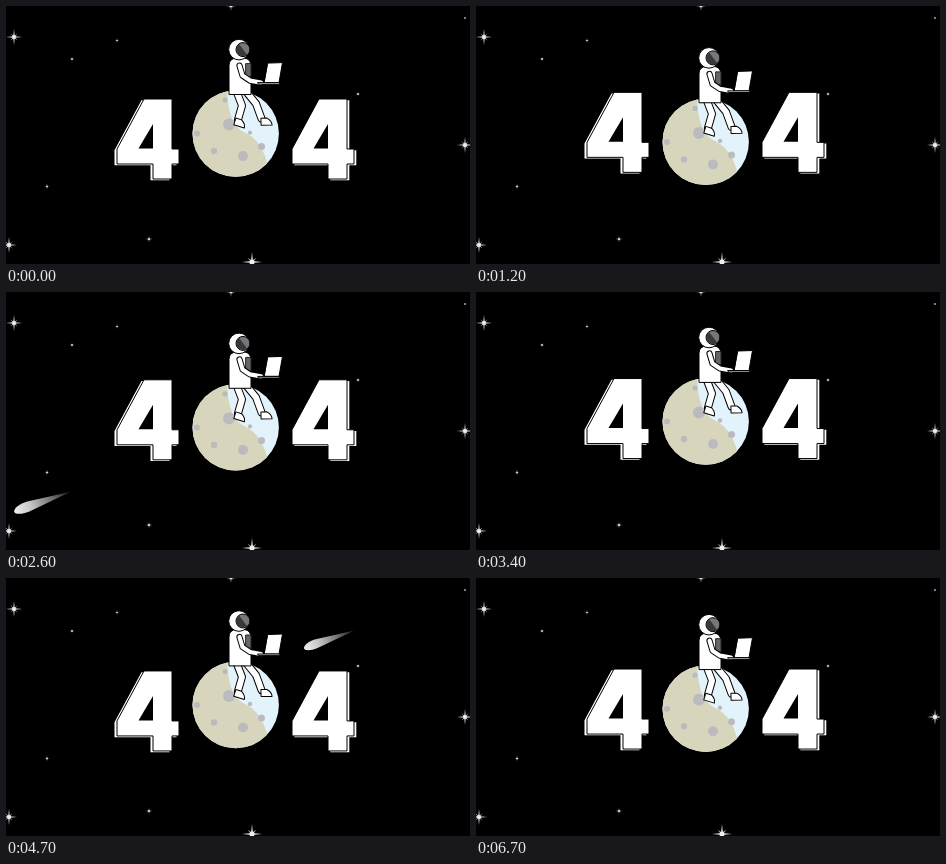
These frames come from a looping animation (464x258 px, 6800 ms). An HTML page with a canvas:

```html
<!DOCTYPE html>
<html lang="en">
<head>
<meta charset="utf-8">
<title>404</title>
<style>
html, body { margin: 0; width: 100%; height: 100%; overflow: hidden; background: #000; }
canvas { display: block; width: 464px; height: 258px; }
</style>
</head>
<body>
<canvas id="stage"></canvas>
<script>
const W = 464, H = 258, LOOP = 6800, STEP = 100;
const canvas = document.getElementById('stage');
const ctx = canvas.getContext('2d');
const ratio = window.devicePixelRatio || 1;
canvas.width = W * ratio;
canvas.height = H * ratio;

// Turning points in ms; odd entries are the high extremes.
const moonTurns = [-500, -400, 300, 1150, 1850, 2520, 3000, 4130, 4720, 5420, 6320, 7180];
const digitTurns = [0, 1100, 1800, 2420, 2950, 3500, 4660, 5340, 6400, 7250];

function swing(turns, t) {
  let i = 0;
  while (i < turns.length - 2 && t >= turns[i + 1]) i++;
  const u = (t - turns[i]) / (turns[i + 1] - turns[i]);
  const e = 0.5 - 0.5 * Math.cos(Math.PI * u);
  return i % 2 ? 1 - e : e;
}

function moonDrop(t) {
  // settles from a slight offset before the first rise
  return t < 300 ? 0.6 * (1 - t / 300) : 9 * swing(moonTurns, t);
}

function trace(points) {
  points.forEach(([x, y], i) => i ? ctx.lineTo(x, y) : ctx.moveTo(x, y));
}

function poly(points, fill, line) {
  ctx.beginPath();
  trace(points);
  ctx.closePath();
  ctx.fillStyle = fill;
  ctx.fill();
  if (line) {
    ctx.strokeStyle = line;
    ctx.lineWidth = 1;
    ctx.stroke();
  }
}

function disc(x, y, r, fill, line) {
  ctx.beginPath();
  ctx.arc(x, y, r, 0, 2 * Math.PI);
  ctx.fillStyle = fill;
  ctx.fill();
  if (line) {
    ctx.strokeStyle = line;
    ctx.lineWidth = 1;
    ctx.stroke();
  }
}

function shifted(x, y, draw) {
  ctx.save();
  ctx.translate(x, y);
  draw();
  ctx.restore();
}

function ray(angle, len, half) {
  const c = Math.cos(angle), s = Math.sin(angle);
  poly([[c * len, s * len], [-s * half, c * half], [-c * len, -s * len], [s * half, -c * half]], '#b9b9b9');
}

function star(x, y, r) {
  shifted(x, y, () => {
    if (r < 2.2) return disc(0, 0, r * 0.65, '#aaa');
    ray(0, r, r * 0.13);
    ray(Math.PI / 2, r, r * 0.13);
    ray(Math.PI / 4, r * 0.6, r * 0.1);
    ray(-Math.PI / 4, r * 0.6, r * 0.1);
    disc(0, 0, r * 0.24, '#eee');
  });
}

const stars = [
  [8, 31, 8], [3, 239, 8], [246, 256, 10], [459, 139, 8], [225, 0, 5],
  [143, 233, 3.5], [41, 180.5, 2.8], [111, 34.5, 2.4], [66, 53, 2], [352, 88, 2], [459, 12, 1.5]
];

function meteor(t) {
  const u = (t - 1300) % 3000;
  if (t < 1300 || u > 1500) return;
  const dx = 32.2 * (u - 400) / 100;
  shifted(298 - dx, 70 + dx * 0.5155, () => {
    const k = 0.97 + 0.13 * Math.max(0, u - 400) / 1000;
    ctx.scale(k, k);
    const g = ctx.createLinearGradient(0, 0, 52, -18);
    g.addColorStop(0, '#f0f0f0');
    g.addColorStop(0.3, '#c4c4c4');
    g.addColorStop(0.75, '#5c5c5c');
    g.addColorStop(1, '#181818');
    ctx.beginPath();
    ctx.moveTo(52, -18);
    ctx.lineTo(14, 0);
    ctx.bezierCurveTo(7, 3, 0, 3, 0, 0);
    ctx.bezierCurveTo(0, -3, 5, -7, 12, -9);
    ctx.closePath();
    ctx.fillStyle = g;
    ctx.fill();
  });
}

const four = [[138, 93], [166, 93], [166, 143], [173, 143], [173, 158], [166, 158],
  [166, 173], [147, 173], [147, 158], [111, 158], [111, 143]];
const hole = [[147, 118], [147, 142.5], [132.5, 142.5]];

function digit(x, y, back) {
  shifted(x, y, () => {
    shifted(back, 1.2, () => poly(four, '#fff'));
    poly(four, '#fff', '#000');
    poly(hole, '#000');
  });
}

function moon() {
  ctx.save();
  ctx.beginPath();
  ctx.arc(229.7, 127, 43.2, 0, 2 * Math.PI);
  ctx.clip();
  ctx.fillStyle = '#e3f3fc';
  ctx.fillRect(180, 80, 100, 100);
  ctx.beginPath();
  ctx.moveTo(180, 80);
  ctx.lineTo(221, 80);
  ctx.bezierCurveTo(222, 108, 227, 120, 239, 126);
  ctx.bezierCurveTo(251, 132, 258, 142, 262, 160);
  ctx.lineTo(250, 180);
  ctx.lineTo(180, 180);
  ctx.closePath();
  ctx.fillStyle = '#d7d6bd';
  ctx.fill();
  for (const [x, y, r] of [[223, 118, 6], [219, 93.5, 2.6], [191, 127, 3], [208, 144.5, 3.2],
    [237, 149.5, 5], [255.5, 140, 3.5], [244, 126, 2.2]]) disc(x, y, r, '#bbbbbf');
  ctx.restore();
}

function limb(points, width) {
  ctx.lineJoin = ctx.lineCap = 'round';
  for (const [color, w] of [['#000', width + 1], ['#fff', width - 1]]) {
    ctx.beginPath();
    trace(points);
    ctx.strokeStyle = color;
    ctx.lineWidth = w;
    ctx.stroke();
  }
}

function foot(x, y, tilt) {
  shifted(x, y, () => {
    ctx.rotate(tilt);
    ctx.beginPath();
    ctx.moveTo(-4, -4);
    ctx.lineTo(2, -4);
    ctx.quadraticCurveTo(7, -1, 7, 3);
    ctx.lineTo(-4, 3);
    ctx.closePath();
    ctx.fillStyle = '#fff';
    ctx.fill();
    ctx.strokeStyle = '#000';
    ctx.lineWidth = 1;
    ctx.stroke();
  });
}

function astronaut() {
  limb([[241, 86], [250, 97], [255.5, 112]], 7);
  foot(259, 115.5, -0.02);
  limb([[231, 86], [236, 99], [232, 113]], 7);
  foot(232.5, 116.5, 0.3);

  ctx.beginPath();
  ctx.moveTo(223, 87.5);
  ctx.lineTo(223, 59);
  ctx.quadraticCurveTo(223, 51.5, 231, 51.5);
  ctx.lineTo(238, 51.5);
  ctx.quadraticCurveTo(245, 52, 245, 60);
  ctx.lineTo(245, 87.5);
  ctx.closePath();
  ctx.fillStyle = '#fff';
  ctx.fill();
  ctx.strokeStyle = '#000';
  ctx.lineWidth = 1;
  ctx.stroke();
  poly([[240, 57], [245, 57], [245, 70], [240, 70]], '#66666a', '#222');

  disc(233, 43, 10.3, '#fff', '#000');
  disc(237, 43, 7, '#77777b', '#000');
  ctx.beginPath();
  ctx.arc(237, 43, 6.5, 0.9, 4.1);
  ctx.closePath();
  ctx.fillStyle = '#39393d';
  ctx.fill();

  limb([[233.5, 59], [236.5, 69], [244, 74], [255, 76]], 5.2);
  poly([[262, 56.5], [276.5, 56], [273, 76], [258.5, 76]], '#fff', '#000');
  poly([[252, 76], [274, 76], [273.5, 77.6], [253, 77.6]], '#e8e8e8', '#000');
}

function draw(t) {
  ctx.setTransform(ratio, 0, 0, ratio, 0, 0);
  ctx.fillStyle = '#000';
  ctx.fillRect(0, 0, W, H);
  stars.forEach(s => star(...s));
  meteor(t);
  const rise = -7 * swing(digitTurns, t);
  digit(0, rise, -2.5);
  digit(175, rise, 2.3);
  shifted(0, moonDrop(t), () => {
    moon();
    astronaut();
  });
}

const start = performance.now();
function tick() {
  const t = (performance.now() - start) % LOOP;
  draw(Math.floor(t / STEP) * STEP);
  requestAnimationFrame(tick);
}
tick();
</script>
</body>
</html>
```
